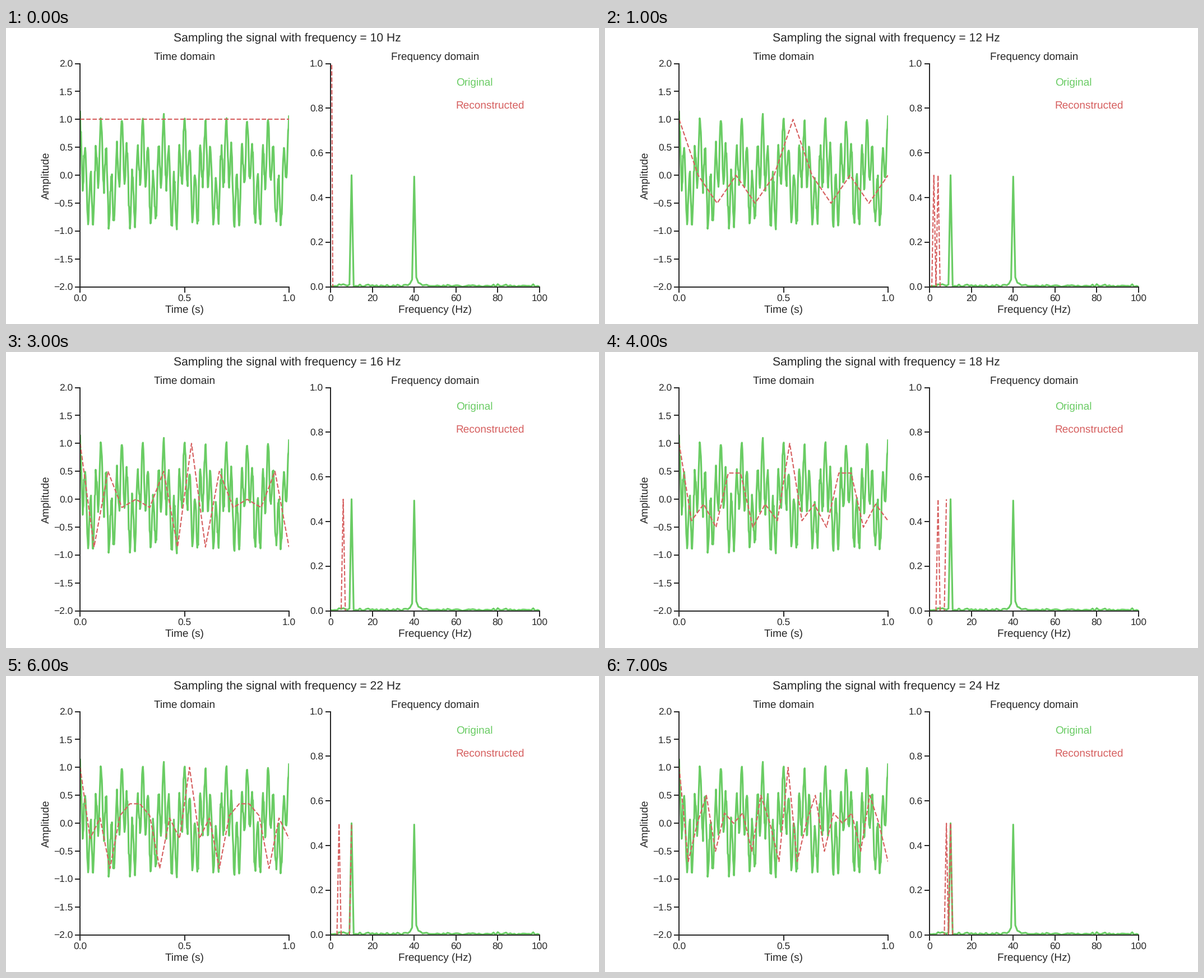
Animation of 1058x529 px, one loop 8 s. Source, as a matplotlib script:

```python
import numpy as np
import matplotlib.pyplot as plt
from matplotlib.animation import FuncAnimation

W, H, DPI = 1058, 529, 64
PT = 72 / DPI  # points per pixel
INK, GREEN, RED = "#262626", "#6acc64", "#d65f5f"

plt.rcParams.update({
    "font.family": "Liberation Sans",
    "text.color": INK,
    "text.hinting": "none",
    "axes.edgecolor": INK,
    "axes.linewidth": 1.98 * PT,
})


def clean(t):
    """Equal parts of a 10 Hz and a 40 Hz cosine."""
    return 0.5 * np.cos(20 * np.pi * t) + 0.5 * np.cos(80 * np.pi * t)


def spectrum(samples, count):
    """Amplitudes of the first whole frequencies of one second of samples."""
    return 2 / len(samples) * np.abs(np.fft.fft(samples))[:count]


def label(x, y, text, size=19, **style):
    """Text with its baseline at a pixel position measured from the top left."""
    style = {"ha": "center", "va": "baseline", **style}
    return fig.text(x / W, 1 - y / H, text, fontsize=size * PT, **style)


def panel(left, xlim, xticks, ylim, yticks):
    ax = fig.add_axes([left / W, 1 - 463 / H, 372.5 / W, 399.5 / H])
    ax.set(xlim=xlim, ylim=ylim, xticks=xticks, yticks=yticks)
    ax.spines[["top", "right"]].set_visible(False)
    ax.tick_params(length=9.5 * PT, width=1.98 * PT, pad=3.7 * PT,
                   labelsize=17.4 * PT, color=INK, labelcolor=INK)
    return ax


def solid(ax, x, y):
    ax.plot(x, y, color=GREEN, lw=3.17 * PT)


def dashed(ax):
    return ax.plot([], [], "--", color=RED, lw=2.11 * PT)[0]


fig = plt.figure(figsize=(W / DPI, H / DPI), dpi=DPI, facecolor="white")

time_ax = panel(132.3, (0, 1), [0, 0.5, 1], (-2, 2), np.arange(-2, 2.1, 0.5))
freq_ax = panel(579.3, (0, 100), range(0, 101, 20), (0, 1), np.linspace(0, 1, 6))

t = np.linspace(0, 1, 500)
noise = np.random.default_rng(3).normal(0, 0.07, t.size)
signal = clean(t) + noise - noise.mean()
solid(time_ax, t, signal)
solid(freq_ax, np.arange(101), spectrum(signal, 101))
time_line, freq_line = dashed(time_ax), dashed(freq_ax)

heading = label(501.5, 23.5, "", 21.1)
label(318.5, 57.3, "Time domain")
label(765.7, 57, "Frequency domain")
label(318.5, 509, "Time (s)")
label(765.7, 509, "Frequency (Hz)")
label(76.8, 263.3, "Amplitude", rotation=90, rotation_mode="anchor")
label(802.8, 103.4, "Original", color=GREEN, ha="left")
label(802.8, 143.4, "Reconstructed", color=RED, ha="left")


def update(frame):
    rate = 10 + 2 * frame
    samples = clean(np.arange(rate) / rate)
    heading.set_text(f"Sampling the signal with frequency = {rate} Hz")
    time_line.set_data(np.linspace(0, 1, rate), samples)
    freq_line.set_data(np.arange(rate // 2), spectrum(samples, rate // 2))
    return heading, time_line, freq_line


animation = FuncAnimation(fig, update, frames=8, interval=1000, repeat=True)
plt.show()
```
